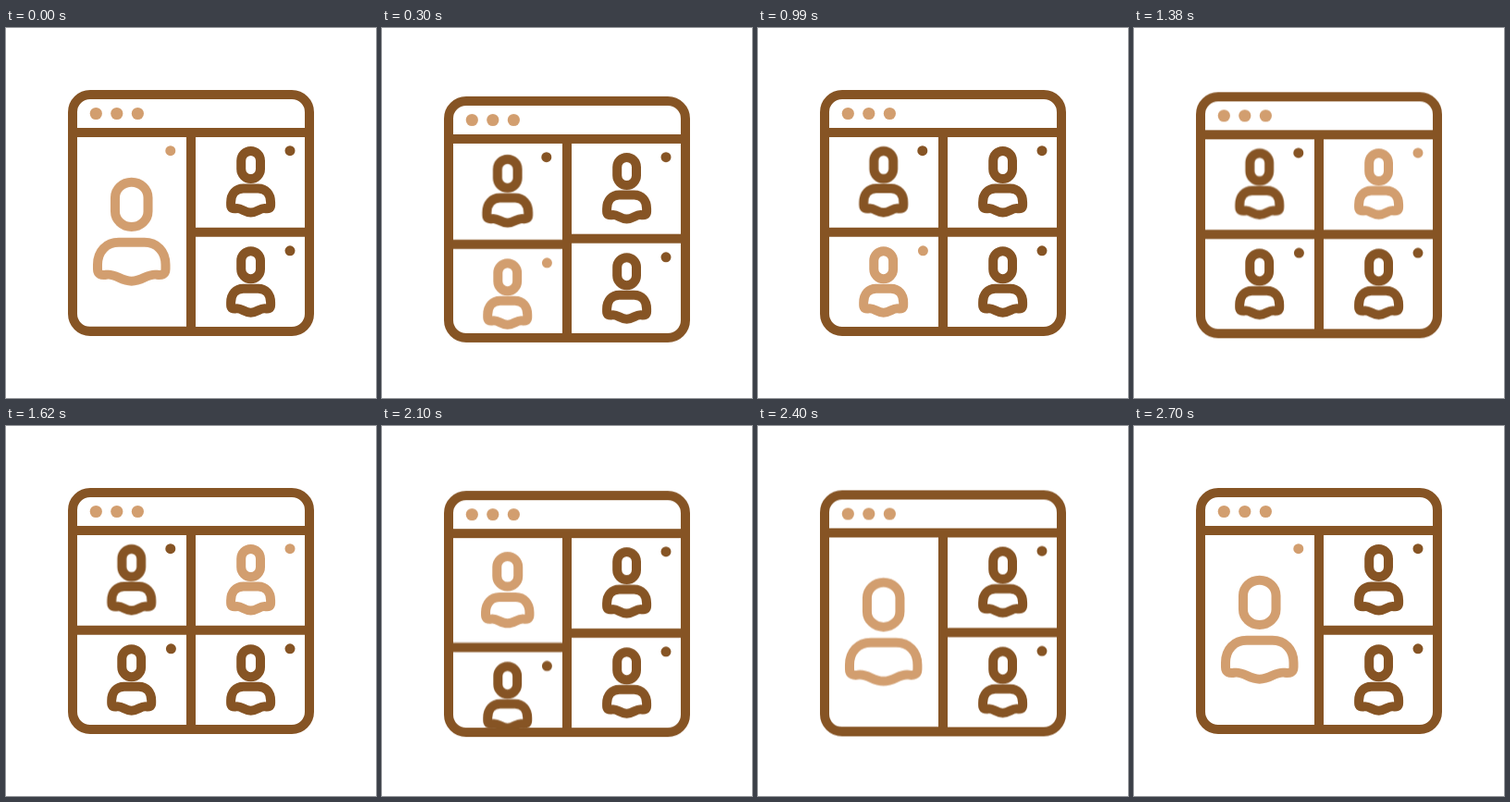
An HTML page without scripts for the animation above (2730 ms loop, 400 px wide and 400 px high).

```html
<!DOCTYPE html>
<html lang="en">
<head>
<meta charset="utf-8">
<title>Video call speakers</title>
<style>
  :root {
    --dark: #865424;
    --light: #d29e6f;
    --loop: 2730ms;
    --glide: cubic-bezier(.42, 0, .22, 1);
  }
  html, body { margin: 0; width: 100%; height: 100%; overflow: hidden; background: #fff; }
  svg { display: block; width: 100vw; height: 100vh; color: var(--dark); }

  .line { fill: none; stroke: currentColor; stroke-width: 10; stroke-linejoin: round; }
  .person * { vector-effect: non-scaling-stroke; }
  .dot { fill: currentColor; }
  .light { color: var(--light); }

  .window { animation: bob var(--loop) infinite; }
  .row { animation: drop var(--loop) var(--glide) infinite; }
  .grow { animation: grow var(--loop) var(--glide) infinite; }

  .first { animation: talk-first var(--loop) step-end infinite; }
  .second { animation: talk-second var(--loop) step-end infinite; }
  .third { animation: talk-third var(--loop) step-end infinite; }
  .first .dot { animation: blink-first var(--loop) step-end infinite; }
  .second .dot { animation: blink-second var(--loop) step-end infinite; }
  .third .dot { animation: blink-third var(--loop) step-end infinite; }

  @keyframes bob {
    0%, 73.626% { transform: translateY(0); animation-timing-function: cubic-bezier(.55, 0, .6, 1); }
    7.692%, 81.319% { transform: translateY(11px); animation-timing-function: cubic-bezier(.2, 0, .4, 1); }
    19.78%, 93.407%, 100% { transform: translateY(0); }
    43.956% { transform: translateY(0); animation-timing-function: ease-in-out; }
    47.8% { transform: translateY(3px); animation-timing-function: ease-in-out; }
    56.5% { transform: translateY(0); }
  }
  @keyframes drop {
    0%, 89.011%, 100% { transform: translateY(107.5px); }
    15.385%, 73.626% { transform: translateY(0); }
  }
  @keyframes grow {
    0%, 89.011%, 100% { transform: translateY(54px) scale(1.71, 1.61); }
    15.385%, 73.626% { transform: translateY(0) scale(1, 1); }
  }

  @keyframes talk-first {
    0%, 74.72%, 100% { color: var(--light); }
    1.09% { color: var(--dark); }
  }
  @keyframes talk-second {
    0%, 45.05%, 100% { color: var(--dark); }
    1.09% { color: var(--light); }
  }
  @keyframes talk-third {
    0%, 74.72%, 100% { color: var(--dark); }
    45.05% { color: var(--light); }
  }

  @keyframes blink-first {
    0%, 80.21%, 91.2%, 100% { opacity: 1; }
    74.72%, 85.71% { opacity: 0; }
  }
  @keyframes blink-second {
    0%, 25.27%, 36.26%, 100% { opacity: 1; }
    19.78%, 30.76% { opacity: 0; }
  }
  @keyframes blink-third {
    0%, 58.24%, 69.23%, 100% { opacity: 1; }
    52.74%, 63.73% { opacity: 0; }
  }
</style>
</head>
<body>
<svg viewBox="0 0 400 400">
  <defs>
    <g id="person" class="line person">
      <rect x="-10.4" y="-33.5" width="20.8" height="30" rx="10.4"/>
      <path d="M-21.5 25V22C-21.5 13-16 7-8 7H8C16 7 21.5 13 21.5 22V25C21.5 28.5 19 29.2 16 28.7C10 27.7 7 33 0 33S-10 27.7-16 28.7C-19 29.2-21.5 28.5-21.5 25Z"/>
    </g>
    <clipPath id="pane"><rect x="72" y="72" width="256" height="256" rx="19"/></clipPath>
  </defs>

  <g class="window">
    <g clip-path="url(#pane)">
      <g class="first">
        <g transform="translate(135.7 166.5)"><g class="grow"><use href="#person"/></g></g>
        <circle class="dot" cx="177.8" cy="132.7" r="5.5"/>
      </g>
      <g class="row">
        <path class="line" d="M72 220.8H200"/>
        <g class="second">
          <use href="#person" x="135.7" y="274.7"/>
          <circle class="dot" cx="178.4" cy="240.8" r="5.5"/>
        </g>
      </g>
      <g class="third">
        <use href="#person" x="264.6" y="166.5"/>
        <circle class="dot" cx="307" cy="132.7" r="5.5"/>
      </g>
      <use href="#person" x="264.6" y="274.7"/>
      <circle class="dot" cx="307" cy="240.8" r="5.5"/>
    </g>

    <path class="line" d="M72 113H328M200 113V328M200 220.8H328"/>
    <rect class="line" x="72" y="72" width="256" height="256" rx="19"/>
    <g class="light">
      <circle class="dot" cx="97.3" cy="92.5" r="6.6"/>
      <circle class="dot" cx="119.8" cy="92.5" r="6.6"/>
      <circle class="dot" cx="142.4" cy="92.5" r="6.6"/>
    </g>
  </g>
</svg>
</body>
</html>
```
